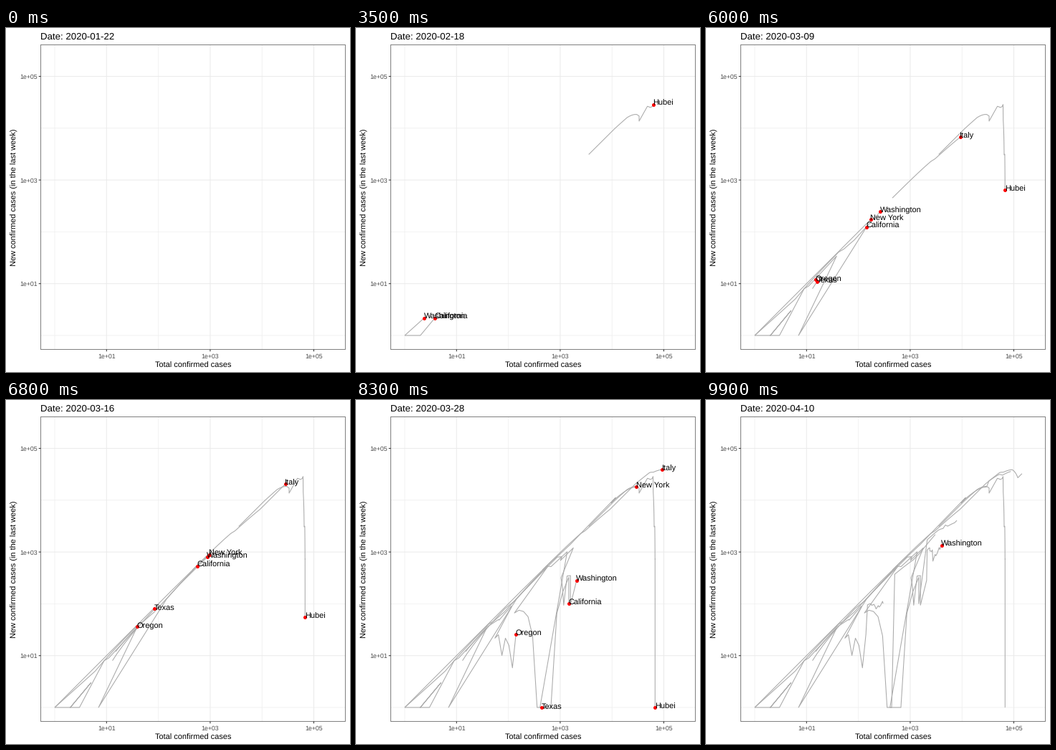
A matplotlib script that plays this animation: 480 by 480 pixels, repeating every 10 s.

```python
import numpy as np
import matplotlib.pyplot as plt
from matplotlib.animation import FuncAnimation

plt.rcParams["font.family"] = "Liberation Sans"
plt.rcParams["text.hinting"] = "none"

FRAMES, LAST_DAY = 100, 79
PT = 0.72                        # points per pixel at 100 dpi
X0, Y0, DECADE = 68.0, 429.0, 72.3
LEFT, RIGHT, TOP, BOTTOM = 48.5, 473.5, 23.5, 448.5
INK, GRID, FRAME = "#4D4D4D", "#EBEBEB", "#333333"


def to_x(v):
    return X0 + DECADE * np.log10(v)


def to_y(v):
    return Y0 - DECADE * np.log10(v)


def trail(knots, start=None, base=0, wobble=0, early=()):
    """Keyframes and positions of total cases against weekly growth.

    Totals grow exponentially between (day, total) knots and equal base
    ahead of them; early holds (day, total, new) points before start.
    """
    at, totals = np.array(knots, float).T

    def total(day):
        value = np.exp(np.interp(day, at, np.log(totals)))
        ripple = np.sin(2 * np.pi * (day - LAST_DAY) / 2.8)
        value = value * (1 + wobble * ripple * (day > 66))
        return np.where(day < at[0], base, value)

    days = np.arange(at[0] if start is None else start, at[-1] + 1)
    new = np.maximum(1, total(days) - total(days - 7))
    rows = np.array([*early, *zip(days, total(days), new)], float)
    keys = np.round(rows[:, 0] * (FRAMES - 1) / LAST_DAY)
    return keys, to_x(rows[:, 1]), to_y(rows[:, 2])


trails = {}
trails["California"] = trail(
    [(48, 144), (54, 557), (59, 1364), (60, 407), (62, 662), (65, 1465),
     (66, 1465), (67, 2136), (70, 3518), (78, 7955)],
    base=20,
    early=[(17.5, 1, 1), (22, 2, 1), (30, 5, 3), (31, 2, 1), (37, 3, 1),
           (39, 9, 8), (41, 11, 9), (44, 38, 34), (46, 7, 1)])
trails["Hubei"] = trail(
    [(0, 444), (7, 3554), (11, 11177), (14, 19665), (18, 29631),
     (20, 33366), (21, 33366), (22, 48206), (28, 62031), (39, 66907),
     (47, 67743), (54, 67798), (78, 67800)],
    start=7)
trails["Italy"] = trail(
    [(28, 3), (35, 453), (41, 2502), (54, 27980), (59, 53578),
     (66, 92472), (78, 143626)],
    start=35)
trails["New York"] = trail(
    [(42, 1), (48, 173), (54, 967), (59, 11710), (60, 9654), (66, 29766),
     (71, 51809), (78, 87725)])
trails["Oregon"] = trail(
    [(48, 15), (54, 39), (55, 65), (56, 66), (58, 114), (59, 114),
     (60, 55), (66, 140), (67, 153), (78, 306)],
    base=3, wobble=0.02)
trails["Texas"] = trail(
    [(48, 16), (54, 85), (59, 581), (60, 131), (66, 439), (75, 1500),
     (78, 3047)],
    base=5, early=[(47, 13, 8)])
trails["Washington"] = trail(
    [(38, 6), (41, 21), (47, 83), (48, 267), (55, 1076), (56, 1014),
     (59, 1793), (60, 1040), (62, 1170), (64, 1577), (65, 1577),
     (66, 2077), (73, 2787), (79, 4025)],
    base=1, wobble=0.02, early=[(7, 1, 1), (18, 1, 1)])

fig = plt.figure(figsize=(4.8, 4.8), dpi=100, facecolor="white")
ax = fig.add_axes([0, 0, 1, 1])
ax.set(xlim=(0, 480), ylim=(480, 0))
ax.axis("off")


def rule(xs, ys, color, width, **kw):
    return ax.plot(xs, ys, color=color, lw=width * PT, snap=False,
                   solid_capstyle="butt", **kw)[0]


def label(x, y, text, size, color="black", **kw):
    return ax.text(x, y, text, fontsize=size * PT, color=color,
                   va="baseline", **kw)


# Grid: odd powers of ten are major
for power in (0, 2, 4, 1, 3, 5):
    width = 1.07 if power % 2 else 0.6
    gx, gy = to_x(10.0 ** power), to_y(10.0 ** power)
    rule([gx, gx], [TOP, BOTTOM], GRID, width, zorder=1)
    rule([LEFT, RIGHT], [gy, gy], GRID, width, zorder=1)
    if power % 2:
        name = f"1e+{power:02d}"
        rule([gx, gx], [BOTTOM, BOTTOM + 2.8], FRAME, 1.07)
        rule([LEFT - 2.8, LEFT], [gy, gy], FRAME, 1.07)
        label(gx, 461, name, 8.8, INK, ha="center")
        label(43.6, gy + 3.4, name, 8.8, INK, ha="right")

rule([LEFT, RIGHT, RIGHT, LEFT, LEFT], [TOP, TOP, BOTTOM, BOTTOM, TOP],
     FRAME, 0.62, zorder=6)
label(261, 474, "Total confirmed cases", 11, ha="center")
label(14.6, 236, "New confirmed cases (in the last week)", 11,
      ha="center", rotation=90, rotation_mode="anchor")
title = label(48.3, 15.4, "", 13.2)

artists = {}
for name in trails:
    artists[name] = (
        rule([], [], "#ABABAB", 1.07, zorder=3, solid_joinstyle="round"),
        ax.plot([], [], "o", color="red", ms=5 * PT, mew=0, zorder=4)[0],
        label(0, 0, name, 11.04, zorder=5),
    )


def draw(i):
    day = i * LAST_DAY // (FRAMES - 1)
    title.set_text(f"Date: {np.datetime64('2020-01-22') + day}")
    for name, (keys, xs, ys) in trails.items():
        line, dot, tag = artists[name]
        x, y = np.interp(i, keys, xs), np.interp(i, keys, ys)
        seen = keys <= i
        if seen.any():
            line.set_data(np.append(xs[seen], x), np.append(ys[seen], y))
        else:
            line.set_data([], [])
        live = keys[0] <= i <= keys[-1]
        dot.set_data([x], [y])
        dot.set_visible(live)
        tag.set_position((x - 0.5, y + 1.4))
        tag.set_visible(live)
    return []


anim = FuncAnimation(fig, draw, frames=FRAMES, interval=100,
                     init_func=lambda: [], repeat=True, repeat_delay=0,
                     blit=False)
plt.show()
```
